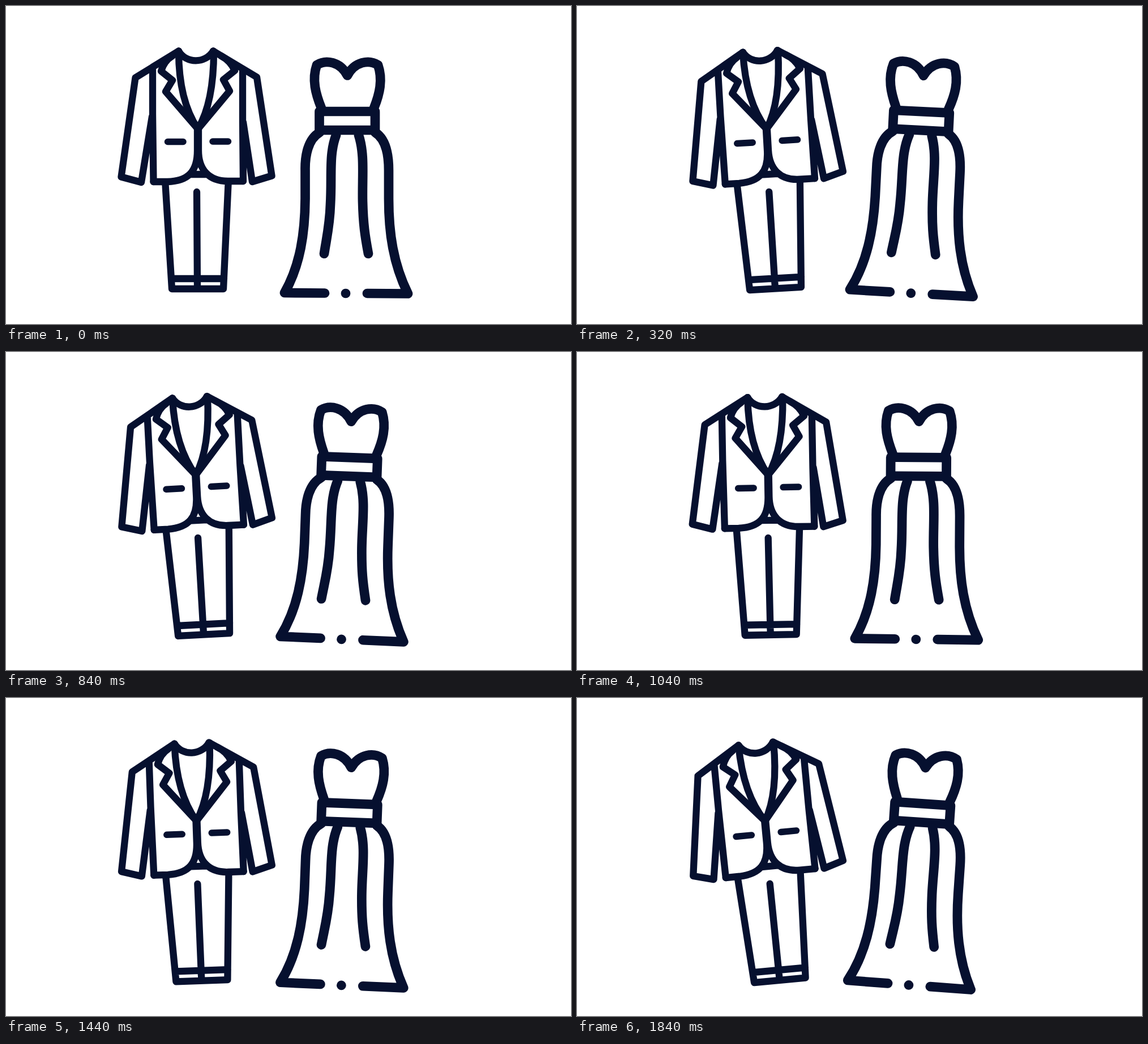
Animation of 998 by 561 pixels, one loop 1.88 s. Source, as an HTML page:

```html
<!DOCTYPE html>
<html lang="en">
<head>
<meta charset="utf-8">
<title>Suit and dress</title>
<style>
  html, body { margin: 0; width: 100%; height: 100%; overflow: hidden; background: #fff; }
  svg { display: block; width: 100vw; height: 100vh; }
  g { fill: none; stroke: #06102f; stroke-linecap: round; stroke-linejoin: round; }
</style>
</head>
<body>
<svg viewBox="0 0 998 561">
  <g id="suit" stroke-width="12.3">
    <!-- sleeves and jacket sides -->
    <path d="M305 79.500L228.500 126.500L203.500 301.500L239 311L258 195M259 112V190L260.500 310"/>
    <path d="M366 79.500L443 125.500L469.500 299.500L435 310L419 205M418 112V205L419 309"/>
    <!-- jacket fronts -->
    <path d="M260.500 310H285C322 309 338 292 338 255V217M419 309H392C357 309 340 287 340 255V217M325 297H354"/>
    <!-- collar, shirt opening and lapels -->
    <path d="M305 79.500C318 102 352 102 366 79.500"/>
    <path d="M305 80C305 130 314 180 339 217M367 80C367 130 361 180 339 217"/>
    <path d="M294 88Q279 97 274 115L294 131L282 151L339 217L395 150L384 130L404 114Q397 97 380 88"/>
    <path stroke-width="11.500" d="M285.500 239.500H313M365 239H392.500"/>
    <!-- trousers -->
    <path d="M281.500 315L293 499H384L392.500 315M293 481H385M337 328L338 499"/>
  </g>
  <g id="dress" stroke-width="16.7">
    <!-- bodice and belt -->
    <path d="M557 180C547 155 540 130 549 104C565 94 590 98 603 122.500C616 98 641 94 657 104C666 130 660 155 650 180"/>
    <path d="M553.500 186H652V219H553.500Z"/>
    <!-- skirt -->
    <path d="M554 223C533 235 528 265 528.500 290V340C528 400 520 457 492 506L563 506.500"/>
    <path d="M652 223C672 235 676 265 676 290V340C676 400 684 455 710 507.500L638 507"/>
    <path d="M583 228C570 262 576 300 573 350C572 385 567 405 562 437M623 228C634 262 629 300 630 345C631 385 634 405 640 437"/>
    <path d="M600 507h0"/>
  </g>
</svg>
<script>
  const LOOP = 1880, STEP = 40;
  // Each part swings between [time, degrees] keys at constant speed.
  const parts = [
    { id: 'suit', pivot: '336 289', dir: -1,
      keys: [[0, 0], [565, 5.8], [1190, -0.5], [1810, 5.75], [LOOP, 5]] },
    { id: 'dress', pivot: '601 303', dir: 1,
      keys: [[0, 0], [535, 4.8], [1130, -0.45], [1750, 4.75], [LOOP, 3.6]] }
  ];

  function angleAt(keys, t) {
    const i = keys.findIndex(key => key[0] > t);
    const [t0, a0] = keys[i - 1], [t1, a1] = keys[i];
    return a0 + (a1 - a0) * (t - t0) / (t1 - t0);
  }

  function draw() {
    const t = Math.floor(performance.now() % LOOP / STEP) * STEP;
    for (const { id, pivot, dir, keys } of parts) {
      document.getElementById(id).setAttribute('transform', `rotate(${dir * angleAt(keys, t)} ${pivot})`);
    }
    requestAnimationFrame(draw);
  }
  draw();
</script>
</body>
</html>
```
